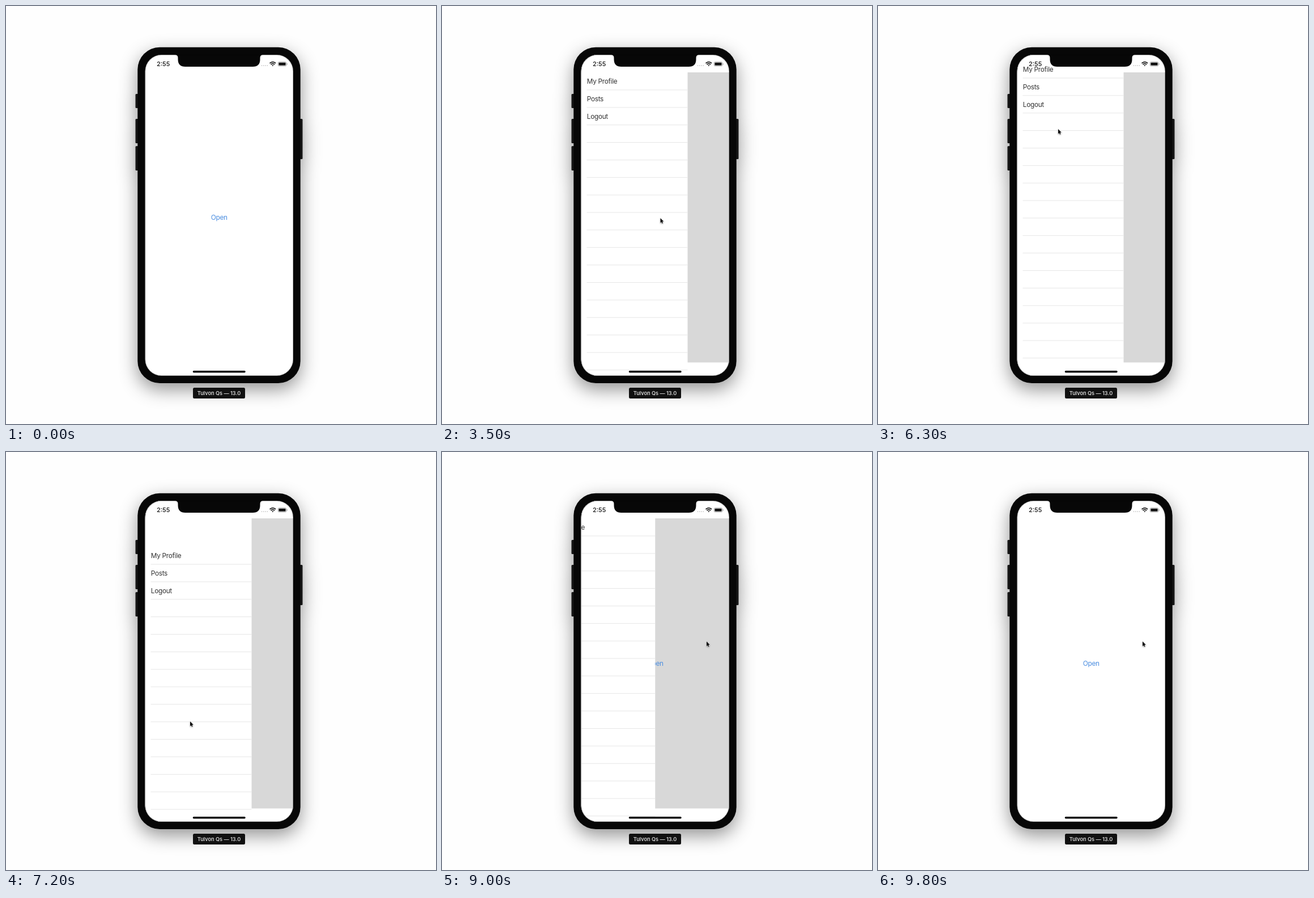
Write an HTML page that moves like this. It is 759 px wide and 737 px high and loops after 10000 ms.

```html
<!DOCTYPE html>
<html lang="en">
<head>
<meta charset="utf-8">
<title>Side menu demo</title>
<style>
  html, body { margin: 0; width: 100%; height: 100%; overflow: hidden; background: #fefefe; }
  svg { display: block; width: 759px; height: 737px; font-family: Inter, sans-serif; }
  .body { filter: drop-shadow(0 11px 16px rgba(0, 0, 0, .42)); }
  .ui { font-size: 11.8px; letter-spacing: -.3px; fill: #333; }
  .line { stroke: #e6e6e6; }
  .cursor { filter: drop-shadow(0 1px 1px rgba(0, 0, 0, .35)); }
</style>
</head>
<body>
<svg viewBox="0 0 759 737">
  <defs>
    <clipPath id="screen"><rect x="245.5" y="86" width="261.5" height="566" rx="29"/></clipPath>
  </defs>

  <g class="body" fill="#070707">
    <g fill="#161616">
      <rect x="228.5" y="155" width="8" height="25" rx="1.5"/>
      <rect x="228.5" y="199" width="8" height="43" rx="1.5"/>
      <rect x="228.5" y="247" width="8" height="43" rx="1.5"/>
      <rect x="515" y="199" width="8.5" height="71" rx="1.5"/>
    </g>
    <rect x="232.3" y="72.8" width="287.4" height="592.2" rx="39"/>
  </g>

  <g clip-path="url(#screen)">
    <rect x="245" y="86" width="263" height="567" fill="#fff"/>
    <rect id="shade" x="245" y="117" width="263" height="511.5" fill="#d8d8d8"/>
    <text class="ui" x="376.3" y="377.3" text-anchor="middle" style="fill:#4a8de0">Open</text>
    <g id="panel">
      <rect x="245" y="86" width="188.5" height="567" fill="#fff"/>
      <g id="list"></g>
    </g>
    <path d="M298 85V86Q303.5 86 303.5 91.5V94Q303.5 107 316.5 107H435.5Q448.5 107 448.5 94V91.5Q448.5 86 454 86V85Z" fill="#070707"/>
    <text x="266" y="106.2" font-size="11" font-weight="500" fill="#161616">2:55</text>
    <path d="M451.5 105H462" stroke="#bbb" stroke-width="1.7" stroke-linecap="round" stroke-dasharray="0 3.3"/>
    <path d="M465.5 100.9Q470.8 96.3 476.1 100.9M467.4 103Q470.8 100.2 474.2 103" fill="none" stroke="#111" stroke-width="1.7"/>
    <path d="M469 104.3H472.6L470.8 106.3Z" fill="#111"/>
    <rect x="480.2" y="98.6" width="14.6" height="7.4" rx="2" fill="#fff" stroke="#999" stroke-width=".8"/>
    <rect x="481.4" y="99.8" width="12.2" height="5" rx="1" fill="#111"/>
    <path d="M496 100.8V103.8" stroke="#999"/>
    <rect x="329.7" y="643" width="93" height="3.5" rx="1.75" fill="#070707"/>
    <rect x="245.5" y="86" width="261.5" height="566" rx="29" fill="none" stroke="#000" stroke-opacity=".35" stroke-width="1.6"/>
  </g>

  <rect x="330" y="673" width="92" height="19" rx="2.5" fill="#111"/>
  <text x="376" y="686.2" font-size="9.2" font-weight="600" text-anchor="middle" fill="#d4d4d4">Tulvon Qs — 13.0</text>

  <g id="cursor">
    <path class="cursor" d="M0 0V8.4L1.9 6.7L3.1 9.4L4.5 8.8L3.3 6.1H5.8Z"
      fill="#0a0a0a" stroke="#fff" stroke-width=".9" paint-order="stroke"/>
  </g>
</svg>

<script>
const LOOP = 10000, STEP = 100;
const PANEL_WIDTH = 188.5, ROW = 30.86, ROWS = 17, LABELS = ['My Profile', 'Posts', 'Logout'];
const SLIDE = 410, GLIDE = 700;
const OPEN_AT = 2550, CLOSE_AT = 8850, CURSOR_IN = 800;

// Cursor stops; each glide ends at the given time.
const stops = [
  { at: CURSOR_IN, x: 150, y: 600 },
  { at: 2200, x: 385.5, y: 374 },
  { at: 5000, x: 464, y: 360 },
  { at: 6200, x: 318, y: 217 },
  { at: 7200, x: 325, y: 475 },
  { at: 8400, x: 467, y: 334 },
];

const $ = id => document.getElementById(id);
const move = (id, x, y) => $(id).setAttribute('transform', `translate(${x} ${y})`);
const show = (id, on) => $(id).setAttribute('visibility', on ? 'visible' : 'hidden');

function ease(x) {
  x = Math.min(1, Math.max(0, x));
  return x * x * (3 - 2 * x);
}

// List pulled away and springing back, furthest at the peak time.
function pull(t, peak, amount) {
  return amount * ease(1 - Math.abs(t - peak) / 500);
}

function cursorAt(t) {
  let { x, y } = stops[0];
  for (const stop of stops.slice(1)) {
    const k = ease((t - stop.at + GLIDE) / GLIDE);
    x += (stop.x - x) * k;
    y += (stop.y - y) * k;
  }
  return [x, y];
}

for (let i = 0; i < ROWS; i++) {
  const y = i * ROW;
  const label = LABELS[i] ? `<text class="ui" x="255.8" y="${136.9 + y}">${LABELS[i]}</text>` : '';
  $('list').innerHTML += `${label}<path class="line" d="M255.5 ${148 + y}H433.5"/>`;
}

function draw(now) {
  const t = Math.floor(now % LOOP / STEP) * STEP;
  const open = ease((t - OPEN_AT) / SLIDE) - ease((t - CLOSE_AT) / SLIDE);
  move('panel', PANEL_WIDTH * (open - 1), 0);
  move('list', 0, pull(t, 6300, -21) + pull(t, 7200, 50));
  move('cursor', ...cursorAt(t));
  show('panel', open > 0);
  show('shade', open > 0);
  show('cursor', t >= CURSOR_IN);
}

const start = performance.now();
function tick() {
  draw(performance.now() - start);
  requestAnimationFrame(tick);
}
tick();
</script>
</body>
</html>
```
